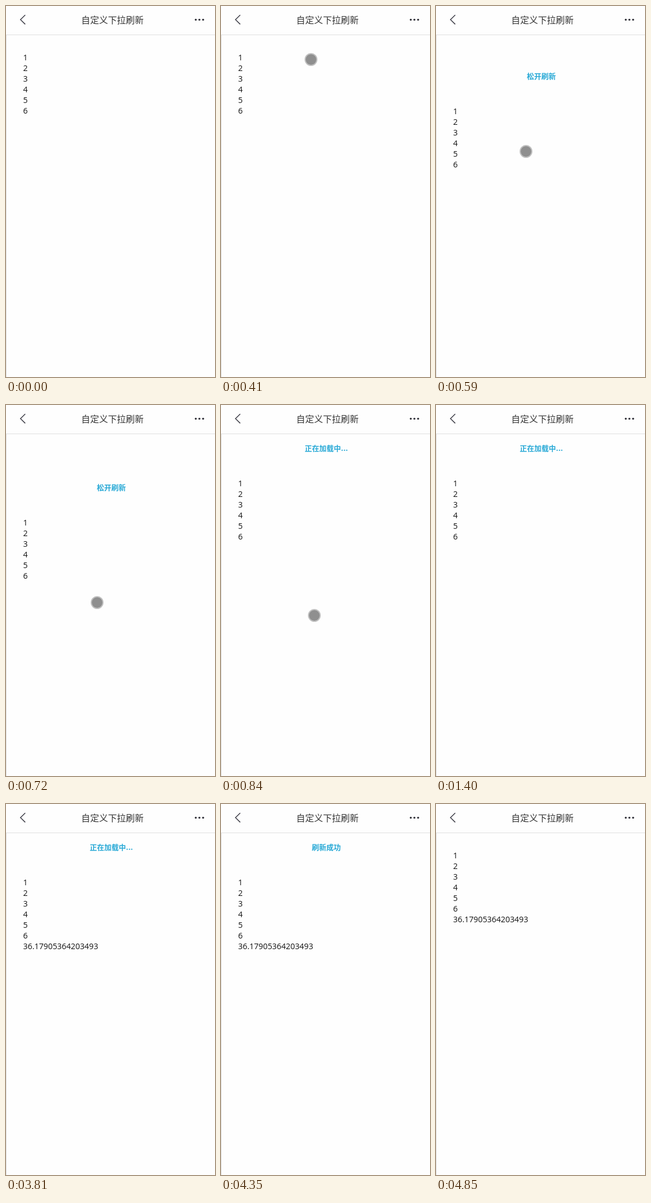
Write an HTML page that moves like this. It is 375 px wide and 662 px high and loops after 5530 ms.

```html
<!DOCTYPE html>
<html lang="zh-CN">
<head>
<meta charset="utf-8">
<title>自定义下拉刷新</title>
<style>
  html, body { margin: 0; width: 100%; height: 100%; overflow: hidden; background: #fefefe; }
  .stage {
    position: relative; width: 375px; height: 662px; overflow: hidden;
    background: #fefefe; color: #111;
    font-family: "Noto Sans CJK SC", "Noto Sans CJK", sans-serif;
  }
  .stage::after {
    content: ""; position: absolute; left: 0; top: 0;
    width: 1px; height: 100%; background: #dedede;
  }

  .bar {
    position: absolute; z-index: 1; left: 0; top: 0; width: 375px; height: 51px;
    background: #fefefe; border-bottom: 1px solid #dfdfdf;
  }
  .bar svg { position: absolute; left: 0; top: 0; }
  .title {
    position: absolute; left: 135px; top: 0;
    font-size: 16px; line-height: 49px; white-space: nowrap; color: #333;
  }

  .track, .label, .extra, .touch { animation: 5530ms step-end infinite; }
  .track { position: absolute; left: 0; top: 0; width: 375px; animation-name: pull; }
  .label {
    position: absolute; left: 1.5px; top: 20px; width: 375px; visibility: hidden;
    font-size: 13px; font-weight: 700; line-height: 18px; text-align: center; color: #28a9d6;
  }
  .release { animation-name: release; }
  .loading { animation-name: loading; }
  .done { animation-name: done; }

  .list {
    position: absolute; left: 30.8px; top: 82px;
    font: 14.3px/19px "Open Sans", "Noto Sans", sans-serif;
  }
  .extra { visibility: hidden; animation-name: extra; }

  .touch {
    position: absolute; z-index: 2; left: 0; top: 0; box-sizing: border-box;
    width: 23px; height: 23px; border: 2px solid #c1c1c1; border-radius: 50%;
    background: #8f8f8f; visibility: hidden; animation-name: touch;
  }

  @keyframes pull {
    0%     { transform: translateY(0); }
    7.95%  { transform: translateY(12px); }
    9.22%  { transform: translateY(72px); }
    10.66% { transform: translateY(96px); }
    11.93% { transform: translateY(108px); }
    13.01% { transform: translateY(118px); }
    14.1%  { transform: translateY(122px); }
    15.18% { transform: translateY(48px); }
    87.7%, 100% { transform: translateY(0); }
  }
  @keyframes release {
    0%     { visibility: hidden; }
    9.22%  { visibility: visible; }
    15.18%, 100% { visibility: hidden; }
  }
  @keyframes loading {
    0%     { visibility: hidden; }
    15.18% { visibility: visible; }
    77.57%, 100% { visibility: hidden; }
  }
  @keyframes done {
    0%     { visibility: hidden; }
    77.57% { visibility: visible; }
    87.7%, 100% { visibility: hidden; }
  }
  @keyframes extra {
    0% { visibility: hidden; }
    68.89%, 100% { visibility: visible; }
  }
  @keyframes touch {
    0%     { visibility: hidden; transform: translate(150px, 84px); }
    6.69%  { visibility: visible; transform: translate(150px, 84px); }
    7.95%  { visibility: visible; transform: translate(150px, 102px); }
    9.22%  { visibility: visible; transform: translate(150px, 171px); }
    10.66% { visibility: visible; transform: translate(150px, 248px); }
    11.93% { visibility: visible; transform: translate(151px, 300px); }
    13.01% { visibility: visible; transform: translate(152px, 341px); }
    14.1%  { visibility: visible; transform: translate(154px, 359px); }
    15.18% { visibility: visible; transform: translate(156px, 364px); }
    22.05% { visibility: visible; transform: translate(184px, 349px); }
    23.14% { visibility: visible; transform: translate(228px, 340px); }
    24.23% { visibility: visible; transform: translate(270px, 324px); }
    25.31%, 100% { visibility: hidden; transform: translate(270px, 324px); }
  }
</style>
</head>
<body>
<div class="stage">
  <div class="track">
    <div class="label release">松开刷新</div>
    <div class="label loading">正在加载中...</div>
    <div class="label done">刷新成功</div>
    <div class="list">
      <div>1</div>
      <div>2</div>
      <div>3</div>
      <div>4</div>
      <div>5</div>
      <div>6</div>
      <div class="extra">36.17905364203493</div>
    </div>
  </div>
  <div class="bar">
    <svg width="375" height="51">
      <path d="M34.5 16 L26 24.3 L34.5 32.6" fill="none" stroke="#3c3c46" stroke-width="1.5"/>
      <g fill="#33333b">
        <circle cx="340.5" cy="24.5" r="1.8"/>
        <circle cx="347" cy="24.5" r="1.8"/>
        <circle cx="353.7" cy="24.5" r="1.8"/>
      </g>
    </svg>
    <div class="title">自定义下拉刷新</div>
  </div>
  <div class="touch"></div>
</div>
</body>
</html>
```
